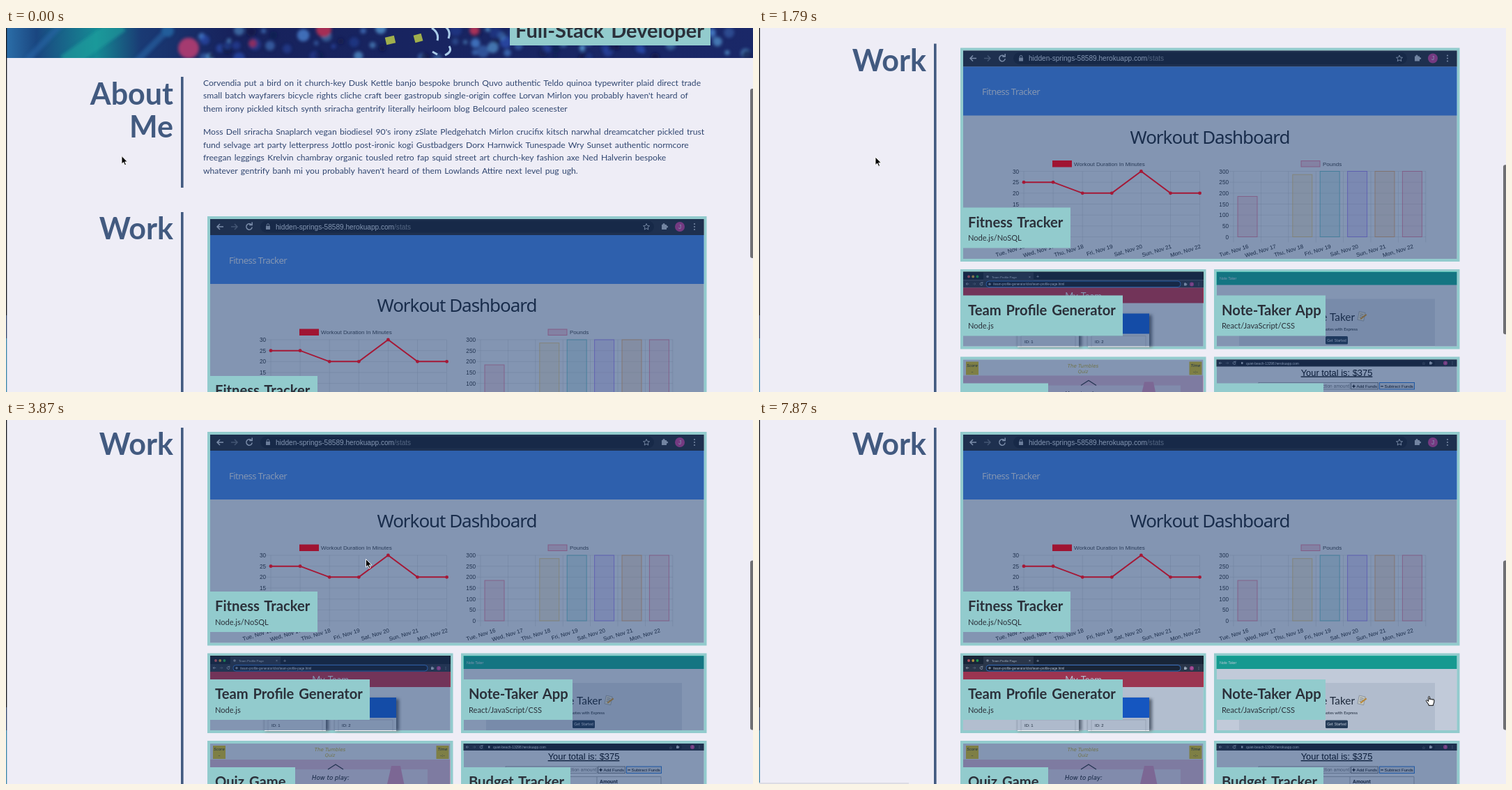
An HTML page for the animation above (8 s loop, 1072x522 px).

```html
<!DOCTYPE html>
<html lang="en">
<head>
<meta charset="utf-8">
<title>Portfolio</title>
<style>
html, body { margin: 0; height: 100%; overflow: hidden; background: #eeedf6; }
svg { display: block; width: 100vw; height: 100vh; }
text { font-family: Lato, sans-serif; word-spacing: .1em; white-space: pre; }
.arial { font-family: "Liberation Sans", Arial, sans-serif; word-spacing: 0; }
.noto { font-family: "Noto Sans", sans-serif; letter-spacing: -.04em; word-spacing: 0; }
.bold { font-weight: 700; }
.mid { text-anchor: middle; }
.end { text-anchor: end; }
.tight { word-spacing: 0; }
.hand { font-family: "DejaVu Sans", sans-serif; font-style: italic; word-spacing: 0; }
</style>
</head>
<body>
<svg id="stage" viewBox="0 0 1072 522" preserveAspectRatio="none"></svg>
<script>
const LOOP = 8000;
const TEAL = '#92cbcd', SLATE = '#425a80', INK = '#2b303a', BAR = '#2c2d31';

const rect = (x, y, w, h, fill, more = '') =>
  `<rect x="${x}" y="${y}" width="${w}" height="${h}" fill="${fill}" ${more}/>`;
const circle = (x, y, r, fill, more = '') =>
  `<circle cx="${x}" cy="${y}" r="${r}" fill="${fill}" ${more}/>`;
const path = (d, stroke, width = 1, more = 'fill="none"') =>
  `<path d="${d}" stroke="${stroke}" stroke-width="${width}" ${more}/>`;
const text = (x, y, size, str, fill, cls = '', more = '') =>
  `<text x="${x}" y="${y}" font-size="${size}" fill="${fill}" class="${cls}" ${more}>${str}</text>`;
const range = n => [...Array(n).keys()];

function hero() {
  const hash = n => Math.abs(Math.sin(n * 91.7) * 4375.5) % 1;
  const bokeh = range(90).map(i => circle(
    280 + hash(i + 1) * 800, hash(i + 90) * 44, 3 + hash(i + 30) * 6,
    ['#2b4db0', '#4a83d0', '#10163f', '#5a9fd8'][i % 4], `opacity="${.35 + hash(i + 7) * .45}"`)).join('');
  return `<defs><linearGradient id="sky">
      <stop offset="0" stop-color="#2b6ea8"/><stop offset=".04" stop-color="#1a4680"/>
      <stop offset=".12" stop-color="#168a94"/><stop offset=".18" stop-color="#1a3a74"/>
      <stop offset=".3" stop-color="#17225c"/><stop offset="1" stop-color="#1a2868"/></linearGradient>
    <filter id="soft"><feGaussianBlur stdDeviation="2"/></filter></defs>`
    + rect(1, -20, 1071, 63, 'url(#sky)')
    + `<g filter="url(#soft)">`
    + path('M85 50L165 -6', '#1ba39f', 24, 'opacity=".6"') + path('M30 46L80 -6M185 50L230 5', '#2a67a5', 9, 'opacity=".6"')
    + bokeh + circle(262, 29, 15, '#a53a70') + circle(232, 4, 9, '#215d9a')
    + circle(354, 22, 6, '#8b2f62') + circle(456, 2, 11, '#a52f55') + circle(672, 3, 7, '#a83159')
    + `</g>`
    + path('M545 19l13 -3M586 16l11 -3', '#b9c84a', 11, 'opacity=".85"')
    + path('M611 0q11 7 8 18M630 -2q9 6 5 17M636 26q5 8 -6 13M612 34l7 4', '#a9cbe8', 3);
}

function aboutText() {
  const lines = [
    [82.5, 'Corvendia put a bird on it church-key Dusk Kettle banjo bespoke brunch Quvo authentic Teldo quinoa typewriter plaid direct trade'],
    [101, "small batch wayfarers bicycle rights cliche craft beer gastropub single-origin coffee Lorvan Mirlon you probably haven't heard of"],
    [119.5, 'them irony pickled kitsch synth sriracha gentrify literally heirloom blog Belcourd paleo scenester'],
    [153, "Moss Dell sriracha Snaplarch vegan biodiesel 90's irony zSlate Pledgehatch Mirlon crucifix kitsch narwhal dreamcatcher pickled trust"],
    [171.5, 'fund selvage art party letterpress Jottlo post-ironic kogi Gustbadgers Dorx Harnwick Tunespade Wry Sunset authentic normcore'],
    [190, 'freegan leggings Krelvin chambray organic tousled retro fap squid street art church-key fashion axe Ned Halverin bespoke'],
    [208.5, "whatever gentrify banh mi you probably haven't heard of them Lowlands Attire next level pug ugh."]];
  return lines.map(([y, str]) => text(283, y, 12.15, str, '#304670')).join('');
}

function card(id, x, y, w, h, picture, badge, title, sub, top = '') {
  return rect(x, y, w, h, TEAL) + rect(x + 4, y + 4, w - 8, h - 8, '#fff') + picture
    + rect(x + 4, y + 4, w - 8, h - 8, 'rgb(18,53,107)', `id="${id}"`) + top
    + rect(x, badge.y, badge.w, 58, TEAL)
    + text(x + 11, badge.y + 28, 20.2, title, INK, 'bold')
    + text(x + 11, badge.y + 47.5, 11.1, sub, INK);
}

const arrows = (x, y, k, gap) => `<g fill="none" stroke="#eee" stroke-width="${1.5 * k}">
  <path d="M${x + 5 * k} ${y}h${-9 * k}m${4 * k} ${-4 * k}l${-4 * k} ${4 * k}l${4 * k} ${4 * k}"/>
  <path opacity=".4" d="M${x + gap - 5 * k} ${y}h${9 * k}m${-4 * k} ${-4 * k}l${4 * k} ${4 * k}l${-4 * k} ${4 * k}"/>
  <path d="M${x + 2 * gap + 3 * k} ${y - 3 * k}a${4.2 * k} ${4.2 * k} 0 1 0 ${1.2 * k} ${3.5 * k}m0 ${-7 * k}v${4 * k}h${-4 * k}"/></g>`;
const puzzle = (x, y, k) => rect(x - 4 * k, y - 3 * k, 7 * k, 7 * k, '#ddd') + circle(x - k, y - 3.5 * k, 1.6 * k, '#ddd') + circle(x + 3.5 * k, y, 1.6 * k, '#ddd');
const avatar = (x, y, r) => circle(x, y, r, '#e0409a') + text(x, y + r * .4, r * 1.2, 'J', '#fff', 'arial mid');
const dots = (x, y, k) => [-1, 0, 1].map(i => circle(x, y + i * 4 * k, 1.1 * k, '#ddd')).join('');

const DAYS = ['Tue', 'Wed', 'Thu', 'Fri', 'Sat', 'Sun', 'Mon'];
function axes(left, right, labelX, unit, xs, tickX) {
  const rows = range(7).map(i => 447 + i * 15.67);
  return rows.map((y, i) => path(`M${left - 7} ${y}H${right}`, '#000', .8, 'opacity=".09"')
      + text(labelX, y + 3, 8.2, (6 - i) * unit, '#333', 'arial end')).join('')
    + xs.map(x => path(`M${x} 447V549`, '#000', .8, 'opacity=".09"')).join('')
    + DAYS.map((d, i) => text(0, 0, 8, `${d}, Nov ${16 + i}`, '#222', 'arial end',
        `transform="translate(${tickX(i) + 2} 557) rotate(-17)"`)).join('');
}

const pointX = i => 380 + i * 42.1, barX = i => 701 + i * 39.4;
const fitness = rect(293, 274, 708.5, 23, BAR) + arrows(307, 285, 1, 21)
  + rect(365, 276.5, 565, 17, '#1d1e21', 'rx="8.5"')
  + rect(373, 284, 6, 5, '#ccc') + path('M374.3 284v-1.5a1.7 1.7 0 0 1 3.4 0v1.5', '#ccc')
  + text(387, 288.5, 10.1, 'hidden-springs-58589.herokuapp.com<tspan fill="#999">/stats</tspan>', '#fff', 'arial')
  + path('M919 280.5l1.3 3 3.2.3-2.4 2.1.7 3.2-2.8-1.7-2.8 1.7.7-3.2-2.4-2.1 3.2-.3z', '#ddd')
  + puzzle(945, 285, 1) + avatar(967, 285, 7) + dots(988, 285, 1)
  + rect(293, 297, 708.5, 70, 'rgb(78,145,245)')
  + text(320, 337.5, 13, 'Fitness Tracker', '#fff', 'noto')
  + text(647, 407, 26, 'Workout Dashboard', '#212529', 'noto mid')
  + text(452, 439.3, 8.05, 'Workout Duration In Minutes', '#444', 'arial')
  + axes(380, 632.5, 373, 5, range(7).map(pointX), pointX)
  + rect(778, 432, 27, 8.5, '#ffd6e0', 'stroke="#ff6384" stroke-opacity=".7"') + text(809, 439.3, 8.05, 'Pounds', '#444', 'arial')
  + axes(681, 957, 674, 50, range(8).map(i => 681 + i * 39.4), barX)
  + [['255,99,132', 185], ['54,162,235', 0], ['255,206,86', 285], ['75,192,192', 300],
     ['153,102,255', 300], ['255,159,64', 300], ['255,99,132', 300]].map(([rgb, v], i) => {
      const h = v * .3133;
      return v ? rect(barX(i) - 14, 541 - h, 28, h, `rgba(${rgb},.16)`, `stroke="rgba(${rgb},.65)"`) : '';
    }).join('');
const points = [25, 25, 20, 20, 30, 20, 20].map((v, i) => [pointX(i), 447 + (30 - v) * 3.133]);
const redLine = rect(421, 431.5, 28, 9.5, '#a01432')
  + path('M' + points.join('L'), '#a51836', 2) + points.map(([x, y]) => circle(x, y, 2.4, '#a51836')).join('');

const memberCard = (x, n) => rect(x + 1, 653, 91, 46, '#777', 'filter="url(#soft)"') + rect(x, 651, 88, 48, '#f8f9fa')
  + rect(x, 651, 88, 29, '#1766e8')
  + path(`M${x + 5} 699v-16h78v16`, '#ccc', .7) + text(x + 10, 693, 6, 'ID: ' + n, '#222', 'arial');
const team = rect(293, 591, 345, 12, '#1c1d20') + rect(322, 592, 72, 11, '#36373b')
  + ['#ff5f57', '#febc2e', '#28c840'].map((c, i) => circle(301 + i * 6.2, 598, 1.9, c)).join('')
  + circle(328, 598, 1.8, '#aaa') + text(334, 600, 4.4, 'Team Profile Page', '#eee', 'arial')
  + text(387, 600, 5, '×', '#eee', 'arial') + text(398, 600.5, 7, '+', '#eee', 'arial')
  + rect(293, 603, 345, 11, '#36373b') + arrows(299, 608.5, .45, 10)
  + rect(326, 604.5, 279, 8.5, '#1d1e21', 'rx="4" stroke="#4a8ff0" stroke-width=".9"') + circle(331, 608.7, 1.7, '#aaa')
  + text(336, 610.5, 4.6, '/team-profile-generator/dist/team-profile-page.html', '#fff', 'arial')
  + puzzle(612, 609, .5) + avatar(621, 609, 3) + dots(631, 609, .45)
  + rect(293, 614, 345, 22, '#dc3545') + text(465.5, 630, 13, 'My Team', '#fff', 'mid')
  + memberCard(371, 1) + memberCard(472, 2);

const note = rect(656.5, 591, 345, 19, '#18bc9c') + text(661, 602.5, 5, 'Note Taker', '#fff')
  + rect(689, 630, 281, 68, '#e9ecef')
  + text(855, 661, 15.4, 'Note Taker', '#212529', 'tight end') + text(859, 675, 5.9, 'Take notes with Express', '#212529', 'tight end')
  + `<g transform="translate(865 655) rotate(12)">` + rect(-5, -6, 9, 12, '#fff8dc', 'stroke="#999" stroke-width=".6"')
  + path('M-3 -3h5M-3 -.5h5M-3 2h3', '#888', .7) + path('M-1 4L6 -4', '#f0a020', 2) + `</g>`
  + rect(813, 683.5, 32, 11.5, '#2c3e50', 'rx="1.5"') + text(829, 691, 5.4, 'Get Started', '#fff', 'mid');

const tag = (x, word, mark) => rect(x, 720, 18, 19, '#f5d21c') + text(x + 9, 727, 5.5, word, '#222', 'hand mid')
  + text(x + 9, 736, 6, mark, '#222', 'hand mid');
const quiz = rect(293, 740, 345, 87, '#f6c9dc') + tag(297, 'Score', '–') + tag(617.5, 'Time', '-:-')
  + text(465, 728, 7, 'The Tumbles', '#d8b820', 'hand mid') + text(465, 736, 6.5, 'Quiz', '#d8b820', 'hand mid')
  + rect(410, 754, 195, 73, '#fbeaf3') + path('M462 754l11 -7l11 7', '#333', 1.2)
  + path('M553 749h13l8 39h-30z', 'none', 0, 'fill="#f2a0c2"')
  + text(466, 769, 8.6, 'How to play:', '#111', 'hand mid')
  + ['Choose an answer to each question shown', 'before the clock on the wall runs out of time'].map((s, i) =>
      text(415, 787 + i * 13, 5.4, s, '#111', 'hand')).join('');

const button = (x, w, label, stroke) => rect(x, 750, w, 9.5, '#eee', `stroke="${stroke}" stroke-width="1"`)
  + text(x + w / 2, 757.3, 6.1, label, '#000', 'arial mid');
const budget = rect(656.5, 717, 345, 10, BAR) + arrows(662, 722, .45, 10)
  + rect(685, 718, 285, 8, '#1d1e21', 'rx="4"') + rect(692, 720.5, 2.5, 3, '#ccc')
  + text(699, 724, 4.9, 'quiet-beach-13298.herokuapp.com', '#fff', 'arial')
  + text(954, 724.5, 6, '☆', '#ddd', 'arial mid') + puzzle(964, 722, .5) + avatar(985, 722, 3) + dots(995, 722, .45)
  + text(829, 740, 12.9, 'Your total is: $375', '#000', 'arial mid', 'text-decoration="underline"')
  + rect(717, 750, 131, 9.5, '#fff', 'stroke="#999" stroke-width=".7"') + text(847, 757.3, 6.7, 'Transaction amount', '#777', 'arial end')
  + button(849.5, 39, '✚ Add Funds', '#888') + button(890.5, 50, '━ Subtract Funds', '#2a7de1')
  + rect(729, 777, 211, 13, '#e4e4e4') + rect(729, 802.5, 211, 12.5, '#e4e4e4')
  + path('M729 764.5H940M729 777H940M729 790H940M729 802.5H940M848 764.5V827M940 764.5V827', '#aaa', .8)
  + ['Amount', '-150', '250', '-125'].map((s, i) =>
      text(852, 773.5 + i * 12.6, 6.8, s, '#111', i ? 'arial' : 'arial bold')).join('');

document.getElementById('stage').innerHTML = rect(0, 0, 1072, 522, '#eeedf6') + `<g id="page">`
  + hero() + rect(0, 43, 1072, 900, '#eeedf6')
  + rect(723, -30, 288, 55, TEAL) + text(731, 14, 29, 'Full-Stack Developer', INK, 'bold')
  + rect(251, 70, 3.6, 159, SLATE) + rect(251, 264, 3.6, 700, SLATE)
  + text(240, 110, 43, 'About', SLATE, 'bold end') + text(240, 157, 43, 'Me', SLATE, 'bold end')
  + text(240, 303, 43, 'Work', SLATE, 'bold end') + aboutText()
  + card('fitness', 289, 270, 716.5, 306.5, fitness, { y: 499, w: 158 }, 'Fitness Tracker', 'Node.js/NoSQL', redLine)
  + card('team', 289, 587.5, 352.5, 114.5, team, { y: 625, w: 233 }, 'Team Profile Generator', 'Node.js')
  + card('note', 653, 587.5, 352.5, 114.5, note, { y: 625, w: 160 }, 'Note-Taker App', 'React/JavaScript/CSS')
  + card('quiz', 289, 713, 352.5, 114.5, quiz, { y: 751, w: 126 }, 'Quiz Game', 'HTML/CSS/JavaScript')
  + card('budget', 653, 713, 352.5, 114.5, budget, { y: 751, w: 157 }, 'Budget Tracker', 'Online/Offline PWA')
  + `</g>` + rect(0, 0, 1.3, 412, '#15171c') + rect(0, 412, 1.3, 33, '#33476a') + rect(0, 445, 1.3, 77, '#3b86a8')
  + rect(0, 520, 215, 2, '#dcdce4', 'id="status"')
  + rect(1068, 0, 8, 243, '#6f6f73', 'rx="3" id="thumb"')
  + `<g id="cursor">` + path('M0 0V11.6L2.7 9.1L4.6 13.4L6.5 12.6L4.7 8.4H8.3Z', '#fff', .9, 'fill="#000" id="arrow"')
  + path('M-1.3 1v6l-1.8 -1.6c-1 -.6 -2 .4 -1.3 1.4l3.4 4.7v1.3h6.6v-1.5l1.2 -3v-3.3c0 -1.4 -2 -1.4 -2 0c0 -1.6 -2.1 -1.6 -2.1 -.3c0 -1.6 -2.1 -1.6 -2.1 -.2V1c0 -1.5 -2 -1.5 -2 0z',
      '#000', 1, 'fill="#fff" id="pointer"') + `</g>`;

const scrollKeys = [[0, 0], [440, 24], [590, 60], [740, 92], [890, 104], [1040, 108], [1190, 111], [1340, 160],
  [1490, 215], [1790, 241.5], [1940, 270], [2090, 290], [2540, 288.5], [2690, 287], [3290, 277], [3440, 262], [3590, 255], [3730, 253]];
const cursorKeys = [[0, 166, 183.5], [1490, 167, 185], [3590, 235, 190], [3730, 400, 197], [3870, 516.5, 199.5],
  [4460, 548, 310], [4610, 574, 419], [4900, 587, 400], [5050, 500, 330], [5200, 330, 250], [5350, 184, 211],
  [5650, 229, 183], [6100, 310, 178], [6240, 405.5, 175.5], [6390, 425, 190], [6540, 440, 215], [6680, 445, 240],
  [6980, 445, 300], [7130, 450, 365], [7280, 490, 400], [7430, 570, 405], [7570, 700, 400], [7720, 860, 397], [7870, 962, 396.5]];
const lightKeys = {
  fitness: [[0, 0], [6100, .04], [6240, .12], [6390, .35], [6540, .55], [6680, .65], [6980, .45], [7130, .2], [7280, .07], [7430, 0]],
  team: [[0, 0], [6980, .06], [7130, .25], [7280, .5], [7430, .62], [7570, .6], [7720, .5], [7870, .38]],
  note: [[0, 0], [7570, .08], [7720, .28], [7870, .5]],
  quiz: [[0, 0]], budget: [[0, 0]]
};
const at = (keys, t) => keys.findLast(k => k[0] <= t);
const set = (id, name, value) => document.getElementById(id).setAttribute(name, value);

function draw() {
  const t = performance.now() % LOOP;
  const scroll = at(scrollKeys, t)[1], [, x, y] = at(cursorKeys, t), pointing = t >= 6100;
  set('page', 'transform', `translate(0 ${-scroll})`);
  set('thumb', 'y', 87 + scroll * .4526);
  set('cursor', 'transform', `translate(${x} ${y})`);
  set('arrow', 'opacity', pointing ? 0 : 1);
  set('pointer', 'opacity', pointing ? 1 : 0);
  set('status', 'opacity', t >= 6390 ? 1 : 0);
  for (const id in lightKeys) set(id, 'opacity', .52 * (1 - at(lightKeys[id], t)[1]));
  requestAnimationFrame(draw);
}
draw();
</script>
</body>
</html>
```
